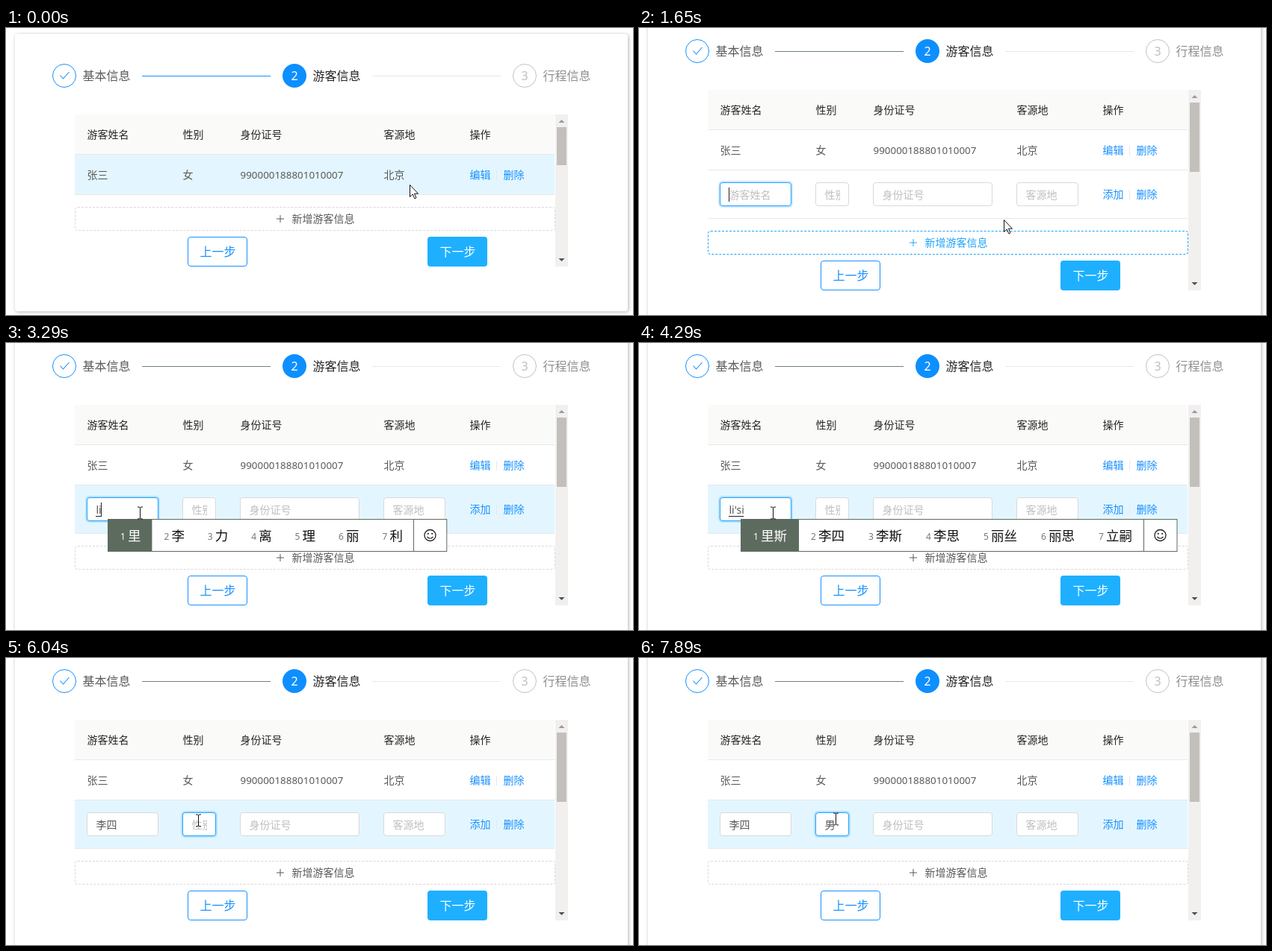
Animation, 839 px wide and 385 px high, one loop 7.99 s. Source, as an HTML page:

```html
<!DOCTYPE html>
<html lang="zh">
<head>
<meta charset="utf-8">
<style>
  html, body { margin: 0; width: 100%; height: 100%; overflow: hidden; background: #fff; }
  svg { display: block; width: 839px; height: 385px; font-family: "Noto Sans", "Noto Sans CJK SC", "Noto Sans CJK", sans-serif; }
  #card { position: absolute; left: 12px; width: 820px; border-radius: 4px; background: #fff; box-shadow: 1px 1px 5px rgba(0, 0, 0, .3); }
  #stage { position: relative; width: 839px; height: 385px; overflow: hidden; }
  #stage svg { position: absolute; left: 0; top: 0; }
  .dashed { box-sizing: border-box; width: 643px; height: 32px; border: 1px dashed; border-radius: 4px; }
</style>
</head>
<body>
<div id="stage"><div id="card"></div><svg id="art" viewBox="0 0 839 385"></svg></div>
<script>
const LOOP = 7990, OPEN = 1430;
const BLUE = '#1890ff', SKY = '#1ea4fa', LINE = '#e8e8e8', GREY = '#595959', EDGE = '#d9d9d9', HINT = '#bfbfbf';
const art = document.getElementById('art'), card = document.getElementById('card');

function el(tag, attrs, parent = art) {
  const node = document.createElementNS('http://www.w3.org/2000/svg', tag);
  set(node, attrs);
  parent.appendChild(node);
  return node;
}
function set(node, attrs) {
  for (const k in attrs) node.setAttribute(k, attrs[k]);
}
function text(s, x, y, fill, parent, size = 14, more = {}) {
  const node = el('text', { x: x + .5, y, fill, 'font-size': size, ...more }, parent);
  node.textContent = s;
  return node;
}
const rect = (x, y, width, height, fill, parent, more = {}) =>
  el('rect', { x, y, width, height, fill, ...more }, parent);
const outline = (x, y, w, h, stroke, parent, more = {}) =>
  rect(x + .5, y + .5, w - 1, h - 1, '#fff', parent, { stroke, rx: 3.5, ...more });
const path = (d, stroke, parent, more = {}) => el('path', { d, stroke, fill: 'none', ...more }, parent);
const show = (node, on) => node.setAttribute('visibility', on ? 'visible' : 'hidden');
const shift = (node, x, y) => node.setAttribute('transform', `translate(${x} ${y})`);

// Steps header and first table rows
const top_ = el('g', {});
el('circle', { cx: 78, cy: 64, r: 15.5, fill: '#fff', stroke: BLUE }, top_);
path('M72.5 63.5L76.5 68L84.5 59', BLUE, top_, { 'stroke-width': 1.1 });
text('基本信息', 102, 70, GREY, top_, 16);
const doneLine = rect(182, 64, 172, 1, BLUE, top_);
el('circle', { cx: 386, cy: 64, r: 16, fill: '#0d8fff' }, top_);
text('2', 385.5, 70, '#fff', top_, 16, { 'text-anchor': 'middle', 'font-weight': 500 });
text('游客信息', 410, 70, '#262626', top_, 16);
rect(490, 64, 172, 1, LINE, top_);
el('circle', { cx: 694, cy: 64, r: 15.5, fill: '#fff', stroke: '#c4c2c4' }, top_);
text('3', 693.5, 70, HINT, top_, 16, { 'text-anchor': 'middle' });
text('行程信息', 718, 70, '#8f8f8f', top_, 16);

const COLS = [108, 236, 313, 505, 620];
rect(92, 116, 642, 53, '#fafaf9', top_);
rect(92, 169, 642, 1, LINE, top_);
['游客姓名', '性别', '身份证号', '客源地', '操作'].forEach((s, i) => text(s, COLS[i], 148, '#262626', top_));
const rowOne = rect(92, 170, 642, 53, '#e3f6ff', top_);
rect(92, 223, 642, 1, LINE, top_);
['张三', '女', '', '北京'].forEach((s, i) => text(s, COLS[i], 202, GREY, top_));
text('990000188801010007', 313, 202, GREY, top_, 13.4);

function actions(label, y, parent) {
  text(label, 620, y, BLUE, parent);
  rect(656, y - 11, 1, 13, LINE, parent);
  text('删除', 665, y, BLUE, parent);
}
actions('编辑', 202, top_);

// Scrollbar
const track = rect(735, 116, 17, 204, '#f1f0ef', top_);
const thumb = rect(737, 133, 13, 51, '#c3c0bb', top_);
el('path', { d: 'M739.5 127h8l-4 -4z', fill: '#9f979f' }, top_);
const downArrow = el('path', { d: 'M739.5 309h8l-4 4z', fill: '#505050' }, top_);

// Buttons
const foot = el('g', {});
const addBox = document.createElement('div');
addBox.className = 'dashed';
el('foreignObject', { x: 92, y: 240, width: 643, height: 32 }, foot).appendChild(addBox);
const addPlus = path('M362 256H372M367 251V261', GREY, foot);
const addText = text('新增游客信息', 382, 261, GREY, foot);
outline(243, 280, 80, 40, BLUE, foot);
text('上一步', 259, 306, BLUE, foot, 16);
rect(564, 280, 80, 40, '#1eb0ff', foot, { rx: 4 });
text('下一步', 580, 306, '#fff', foot, 16);

// Editable row
const edit = el('g', {});
const rowTwo = rect(92, 191, 642, 64, '#e3f6ff', edit);
rect(92, 255, 642, 1, LINE, edit);
const fields = [['游客姓名', 108, 96], ['性别', 236, 45], ['身份证号', 313, 160], ['客源地', 505, 83]].map(([hint, x, w], i) => {
  const glow = rect(x - 2, 205, w + 4, 36, BLUE, edit, { rx: 6 });
  const box = outline(x, 207, w, 32, EDGE, edit);
  const clip = el('clipPath', { id: 'clip' + i }, edit);
  rect(x + 12, 208, w - 24, 30, '#000', clip);
  const label = text(hint, x + 12, 229, HINT, edit, 14, { 'clip-path': `url(#clip${i})` });
  return { hint, x: x + 12, glow, box, label };
});
actions('添加', 228, edit);
const underline = rect(120, 232, 20, 1, '#222', edit);
const caret = rect(120, 214, 1, 19, '#222', edit);

// Input method window
const ime = el('g', {});
const imeBox = outline(136, 236, 585, 44, '#5d6b5f', ime, { rx: 0 });
const imeFirst = rect(136, 236, 78, 44, '#5d6b5f', ime);
const slots = Array.from({ length: 7 }, (_, i) => [
  text(i + 1, 0, 264, i ? '#777' : '#fff', ime, 12),
  text('', 0, 265, i ? '#111' : '#fff', ime, 17.5)
]);
const imeEnd = el('g', {}, ime);
rect(0, 236, 1, 44, '#5d6b5f', imeEnd);
el('circle', { cx: 22.5, cy: 258, r: 7.5, fill: 'none', stroke: '#222', 'stroke-width': 1.3 }, imeEnd);
el('circle', { cx: 19.8, cy: 255.8, r: 1.1, fill: '#222' }, imeEnd);
el('circle', { cx: 25.2, cy: 255.8, r: 1.1, fill: '#222' }, imeEnd);
path('M18.5 260Q22.5 264.5 26.5 260', '#222', imeEnd, { 'stroke-width': 1.2 });

// Pointers
const ink = { fill: '#fff', 'stroke-linejoin': 'round' };
const pointers = {
  arrow: path('M.5 .5V16.5L4.2 13L6.8 18.8L9 17.8L6.5 12.2H11.5Z', '#111', art, ink),
  beam: path('M-3 -8H-1L.5 -7L2 -8H4M.5 -7V7M-3 8H-1L.5 7L2 8H4', '#111'),
  hand: path('M3.5 14V2.2Q3.5 .5 5 .5T6.5 2.2V8.5Q6.8 7.5 8 7.7T9.5 9.3Q9.8 8.3 11 8.7T12 10.3Q13.4 9.8 13.4 11.5V16Q13.4 18 12 20V23.5H4V21L-1.8 14.5Q-4 12 -2 11.5T1.5 12.8L3.5 14M6.5 8.5V12.5M9.5 9.3V12.5M12 10.3V13', '#111', art, ink)
};

// time, x, y, pointer
const MOVES = [
  [0, 540, 210, 'arrow'], [440, 537, 207, 'arrow'], [550, 528, 200, 'beam'], [660, 522, 207, 'beam'],
  [770, 514, 218, 'arrow'], [880, 505, 232, 'arrow'], [990, 496, 246, 'hand'], [1110, 490, 254, 'hand'],
  [1220, 488, 257, 'hand'], [1430, 488, 257, 'arrow'], [1750, 470, 257, 'arrow'], [1860, 430, 257, 'arrow'],
  [1970, 380, 256, 'arrow'], [2080, 325, 255, 'arrow'], [2200, 285, 251, 'arrow'], [2310, 238, 244, 'arrow'],
  [2420, 202, 234, 'beam'], [2530, 185, 229, 'beam'], [2640, 179, 228, 'beam'], [4720, 183, 227, 'beam'],
  [4830, 200, 226, 'beam'], [4940, 220, 226, 'arrow'], [5050, 242, 226, 'beam'], [5160, 253, 222, 'beam'],
  [5280, 257, 218, 'beam'], [7340, 258, 217, 'beam'], [7450, 260, 217, 'beam'], [7560, 261, 216, 'beam'],
  [7660, 262, 216, 'beam'], [7890, 263, 216, 'beam']
];

// time, field, typed text, candidates, cell width, start of caret blink
const LISI = '里斯 李四 李斯 李思 丽丝 丽思 立嗣';
const TYPING = [
  [OPEN, 0, '', '', 0, 1480],
  [3180, 0, 'l', '了 来 里 老 啦 两 拉', 58.4, 3180],
  [3290, 0, 'li', '里 李 力 离 理 丽 利', 58.4, 3290],
  [3620, 0, "li's", LISI, 77, 3620],
  [3750, 0, "li'si", LISI, 77, 3755],
  [4390, 0, '李四', '', 0, 4390],
  [5490, 1, '', '', 0, 5500],
  [6140, 1, 'n', '你 那 呢 能 年 嗯 哪', 60.4, 6140],
  [6250, 1, 'na', '那 哪 拿 呐 娜 纳 钠', 60.4, 6250],
  [6360, 1, 'nan', '男 难 南 楠 喃 囡 腩', 60.4, 6270],
  [6900, 1, '男', '', 0, 6910]
];

const at = (table, t) => table.filter(row => row[0] <= t).pop();
const fade = (t, start, span = 300) => {
  const p = Math.min(1, Math.max(0, (t - start) / span));
  return p * (2 - p);
};
function mix(a, b, p) {
  const part = (c, i) => parseInt(c.slice(i, i + 2), 16);
  return `rgb(${[1, 3, 5].map(i => Math.round(part(a, i) + (part(b, i) - part(a, i)) * p))})`;
}

function drawButton(t) {
  const p = t < OPEN ? fade(t, 980) : 1 - fade(t, 1660);
  const hot = t >= 1320 && t < OPEN ? '#0f66d6' : SKY;
  const ink = mix(GREY, hot, p);
  addBox.style.borderColor = mix(EDGE, hot, p);
  set(addPlus, { stroke: ink });
  set(addText, { fill: ink });
}

function drawIme(x, list, w) {
  show(ime, list);
  if (!list) return;
  set(imeBox, { x: x + .5, width: 7 * w + 44.5 });
  set(imeFirst, { x, width: w + 1 });
  list.split(' ').forEach((s, i) => {
    const [num, word] = slots[i];
    set(num, { x: x + 17 + i * w });
    set(word, { x: x + 27 + i * w });
    word.textContent = s;
  });
  shift(imeEnd, Math.round(x + 1 + 7 * w) - 1, 0);
}

function drawEdit(t) {
  const [, active, typed, list, w, blink] = at(TYPING, t);
  const focus = [fade(t, OPEN, 200) * (1 - fade(t, 5490)), fade(t, 5490, 220), 0, 0];
  const hover = [0, fade(t, 5050), 0, 0];
  fields.forEach((f, i) => {
    const value = i === active ? typed : i < active ? '李四' : '';
    f.label.textContent = value || f.hint;
    set(f.label, { fill: value ? GREY : HINT });
    set(f.glow, { opacity: .22 * focus[i] });
    set(f.box, { stroke: mix(EDGE, SKY, Math.max(focus[i], hover[i])) });
  });
  const f = fields[active];
  const len = typed ? f.label.getComputedTextLength() : 0;
  show(underline, list);
  set(underline, { x: f.x, width: len });
  set(caret, { x: Math.round(f.x + len) });
  show(caret, Math.floor((t - blink) / 530) % 2 === 0);
  set(rowTwo, { opacity: fade(t, 2190) });
  drawIme(f.x + 16, list, w);
}

function draw(t) {
  const open = t >= OPEN;
  const h = open ? 269 : 204;
  card.style.top = (open ? -25 : 8) + 'px';
  card.style.height = (open ? 437 : 372) + 'px';
  shift(top_, 0, open ? -33 : 0);
  shift(foot, 0, open ? 32 : 0);
  shift(downArrow, 0, h - 204);
  set(track, { height: h });
  set(thumb, { height: open ? 93 : 51 });
  set(doneLine, { fill: open ? '#6f7d86' : BLUE });
  set(rowOne, { opacity: 1 - fade(t, 870) });
  edit.style.display = ime.style.display = open ? '' : 'none';
  drawButton(t);
  if (open) drawEdit(t);

  const [, x, y, kind] = at(MOVES, t);
  for (const k in pointers) show(pointers[k], k === kind);
  shift(pointers[kind], x, y);
}

const start = performance.now();
function tick() {
  draw((performance.now() - start) % LOOP);
  requestAnimationFrame(tick);
}
tick();
</script>
</body>
</html>
```
